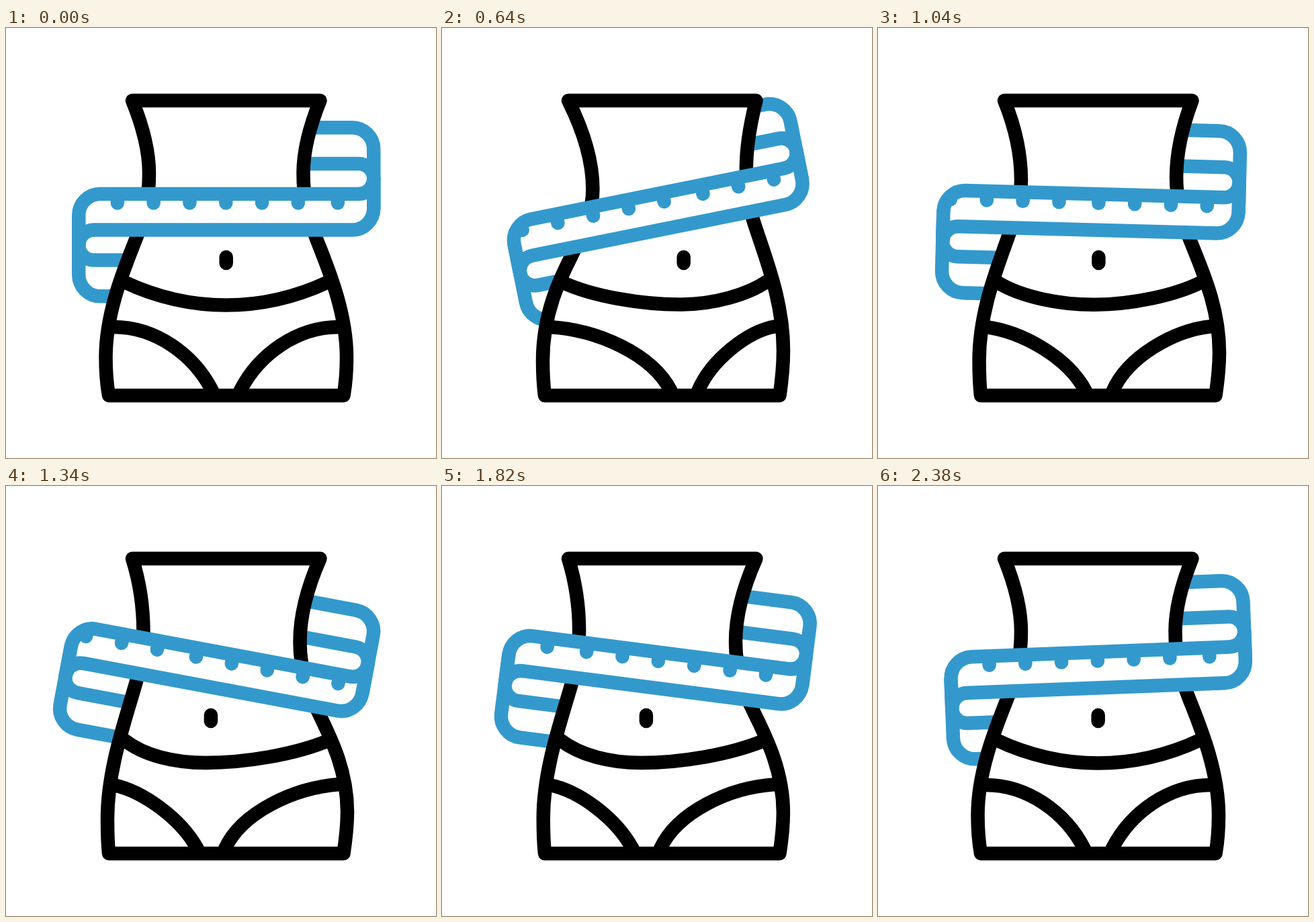
An HTML page with a canvas for the animation above (2.4 s loop, 640 by 640 pixels).

```html
<!DOCTYPE html>
<html lang="en">
<head>
<meta charset="utf-8">
<title>Waist measuring</title>
<style>
  html, body { margin: 0; height: 100%; overflow: hidden; background: #fff; }
  canvas { display: block; }
</style>
</head>
<body>
<canvas id="stage" width="640" height="640"></canvas>
<script>
const ctx = document.getElementById('stage').getContext('2d');
const LOOP = 2400;
const BLUE = '#3399cc';

// Body poses share one structure: closed outline, then inner lines.
const upright = [
  `M188 108C205 150 213 185 213 216C213 252 207 280 194.5 311
   C181 347 148.5 418 148.5 490C148.5 513 150 530 153 547
   L502.5 547C505.5 530 507 513 507 490C507 418 474.5 347 461 311
   C448.5 280 442.5 252 442.5 216C442.5 185 450.5 150 467.5 108Z`,
  `M176 378C225 401 277 412.5 327.7 412.5C378.5 412.5 430.5 401 479.5 378
   M160 445C222 445 279 485 307 540M495.5 445C433.5 445 376.5 485 348.5 540
   M327.7 341L327.7 350`];
const leanRight = [
  `M188 108C210 152 224.5 195 224.5 240C224.5 280 208 308 193 339
   C176 372 150 425 150 495C150 515 151 532 153 547
   L502.5 547C505 530 508 505 508 480C508 405 481 342 463 285
   C458 268 453 240 453 209C453 175 460 138 467.5 108Z`,
  `M178 378C225 400 300 412 357 411.5C405 411 455 397 484 377
   M160 445C230 449 312 484 341 540M497 444C455 451 401 494 381.5 540
   M360 341L360 350`];
const leanLeft = [
  `M188 108C198 140 204.5 175 204.5 217C204.5 245 200 268 194.5 289
   C179 345 151 420 151 495C151 515 151.5 532 153 547
   L502.5 547C505 530 508 508 508 485C508 425 485 378 465.5 338
   C452 311 437.5 278 437.5 232C437.5 190 449 150 467.5 108Z`,
  `M176 378C205 401 250 412 297 412C355 412 430 400 482 378
   M160 445C203 454 260 494 285 540M497 444C427 449 350 487 326 540
   M305 341L305 350`];

// Keys: [time, value, value]
const bodyKeys = [[0, 0, 0], [515, 1.045, -.045], [1500, -.08, 1.08], [1660, -.08, 1.08], [LOOP, 0, 0]];
const tapeKeys = [[0, 0, 0], [510, -12.6, -5.5], [1470, 11.8, -14.6], [LOOP, -2.2, 0]];

// One half of the tape around its centre; the other half is this turned by 180 degrees.
const tapeFront = new Path2D('M-219.5 50V5.25A32 32 0 0 1 -187.5 -26.75H197A22.5 22.5 0 0 0 219.5 -49.25');
const tapeBack = new Path2D('M-219.5 5V93.5A32 32 0 0 0 -187.5 125.5H0M-197 26.75A22.5 22.5 0 0 0 -197 71.75H0');
const band = new Path2D();
band.roundRect(-219.5, -26.75, 439, 53.5, [32, 0, 32, 0]);

const TICK_GAP = 53.8, TICK_GROUP = 328, SLIDE_TIME = 2200;

function track(keys, t) {
  const i = keys.findIndex(k => k[0] > t);
  const from = keys[i - 1], to = keys[i];
  const x = (t - from[0]) / (to[0] - from[0]);
  const p = x * x * (3 - 2 * x);
  return from.slice(1).map((v, n) => v + (to[n + 1] - v) * p);
}

function mixPose(part, right, left) {
  const numbers = s => s.match(/[\d.]+/g).map(Number);
  const r = numbers(leanRight[part]), l = numbers(leanLeft[part]);
  let i = 0;
  return new Path2D(upright[part].replace(/[\d.]+/g, s => {
    const v = +s, mixed = v + (r[i] - v) * right + (l[i] - v) * left;
    i++;
    return mixed.toFixed(3);
  }));
}

function onTape([angle, shift], paint) {
  ctx.save();
  ctx.translate(327.75 + shift, 273.75);
  ctx.rotate(angle * Math.PI / 180);
  ctx.strokeStyle = BLUE;
  paint();
  ctx.restore();
}

function strokeBothHalves(path) {
  ctx.stroke(path);
  ctx.rotate(Math.PI);
  ctx.stroke(path);
  ctx.rotate(-Math.PI);
}

function drawTicks(t) {
  const start = 166.25 - TICK_GROUP * Math.min(t / SLIDE_TIME, 1);
  ctx.clip(band);
  ctx.beginPath();
  for (let group = -1; group <= 1; group++) {
    for (let k = 0; k < 6; k++) {
      const x = start + group * TICK_GROUP + k * TICK_GAP;
      ctx.moveTo(x, -27);
      ctx.lineTo(x, -13.2);
    }
  }
  ctx.stroke();
}

function drawBody(t) {
  const [right, left] = track(bodyKeys, t);
  const outline = mixPose(0, right, left);
  ctx.strokeStyle = '#000';
  ctx.fill(outline);
  ctx.stroke(outline);
  ctx.stroke(mixPose(1, right, left));
}

function draw() {
  const t = performance.now() % LOOP;
  const tape = track(tapeKeys, t);
  ctx.fillStyle = '#fff';
  ctx.fillRect(0, 0, 640, 640);
  ctx.lineWidth = 20.5;
  ctx.lineCap = ctx.lineJoin = 'round';

  onTape(tape, () => strokeBothHalves(tapeBack));
  drawBody(t);
  onTape(tape, () => {
    ctx.fill(band);
    strokeBothHalves(tapeFront);
    drawTicks(t);
  });
  requestAnimationFrame(draw);
}
draw();
</script>
</body>
</html>
```
